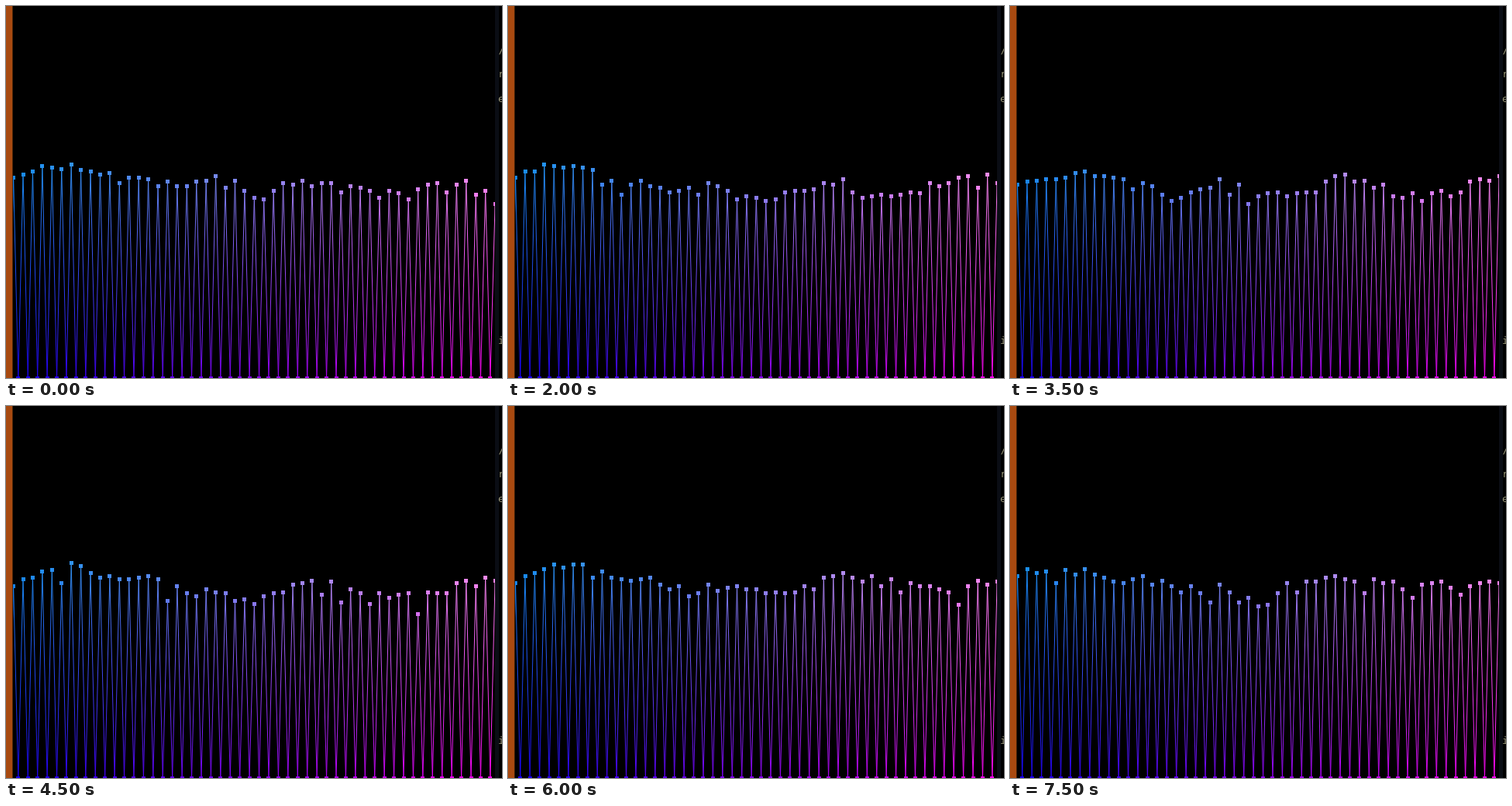
Recreate the animation shown at these times as an HTML page with a canvas. Size 640 px wide and 480 px high, loop 8 s.

```html
<!DOCTYPE html>
<html lang="en">
<head>
<meta charset="utf-8">
<title>Spectrum</title>
<style>
html, body { margin: 0; width: 100%; height: 100%; overflow: hidden; background: #000; }
canvas { display: block; }
</style>
</head>
<body>
<canvas id="stage" width="640" height="480"></canvas>
<script>
const ctx = document.getElementById('stage').getContext('2d');
const W = 640, H = 480, LOOP = 8000, STEP = 500;
const LEFT = 9, RIGHT = 631, BARS = 51, GAP = 12.43, X0 = 9.6;
const BASE = 232, UNIT = H / 256;

// Lasting hills and dips of the spectrum along the bars
const bumps = [
  { at: 5.5, width: 5, lift: 20 },
  { at: 17, width: 2, lift: -10 },
  { at: 25, width: 2.2, lift: -15 },
  { at: 33, width: 2, lift: 8 },
  { at: 41, width: 3, lift: -9 },
  { at: 50, width: 4, lift: 5 }
];

const mix = (a, b, t) => a + (b - a) * t;
const bell = d => Math.exp(-d * d);

// Seeded random number from -1 to 1
function noise(i, seed) {
  const s = Math.sin(i * 127.1 + seed * 311.7 + 17.3) * 43758.5453;
  return (s - Math.floor(s)) * 2 - 1;
}

function smoothNoise(x, seed) {
  const n = Math.floor(x), t = x - n;
  return mix(noise(n, seed), noise(n + 1, seed), t * t * (3 - 2 * t));
}

function peakY(i, step) {
  let y = BASE;
  for (const b of bumps) y -= b.lift * bell((i - b.at) / b.width);
  y += 10 * smoothNoise(i / 5, step + 40);
  const n = noise(i, step);
  y += 7 * n + 16 * Math.max(0, n) ** 8;
  return H - Math.round((H - y) / UNIT) * UNIT;
}

// Red rises to the right, green rises with height
function tint(x, y) {
  const r = mix(18, 255, x / W), g = (H - y) * 0.53;
  return `rgb(${Math.round(r)},${Math.round(g)},240)`;
}

function line(x1, y1, x2, y2) {
  const g = ctx.createLinearGradient(0, y1, 0, y2);
  g.addColorStop(0, tint(x1, y1));
  g.addColorStop(1, tint(x2, y2));
  ctx.strokeStyle = g;
  ctx.beginPath();
  ctx.moveTo(x1, y1);
  ctx.lineTo(x2, y2);
  ctx.stroke();
}

function dot(x, y) {
  ctx.fillStyle = tint(x, y);
  ctx.fillRect(Math.round(x - 2.5), Math.round(y - 2.5), 5, 5);
}

function box(color, x, w) {
  ctx.fillStyle = color;
  ctx.fillRect(x, 0, w, H);
}

function drawSides() {
  box('#a84a10', 0, 8);
  box('#4c2608', 8, 1);
  box('#0a0d14', RIGHT, 5);
  ctx.fillStyle = '#989678';
  ctx.font = '13px "DejaVu Sans Mono", monospace';
  ctx.fillText('/', 635.5, 61);
  ctx.fillText('r', 635, 92);
  ctx.fillText('e', 635, 124);
  ctx.fillText('i', 635, 436);
}

function draw(step) {
  box('#000', 0, W);
  drawSides();

  ctx.save();
  ctx.beginPath();
  ctx.rect(LEFT, 0, RIGHT - LEFT, H);
  ctx.clip();
  const peaks = Array.from({ length: BARS }, (_, i) => ({ x: X0 + i * GAP, y: peakY(i, step) }));
  for (const { x, y } of peaks) {
    line(x, y, x - GAP / 2, H);
    line(x, y, x + GAP / 2, H);
  }
  for (const { x, y } of peaks) {
    dot(x, y);
    dot(x + GAP / 2, H);
  }
  ctx.restore();
}

const start = performance.now();
let shown = 0;

function tick() {
  const t = (performance.now() - start) % LOOP;
  const step = Math.floor(t / STEP);
  if (step !== shown) draw(shown = step);
  requestAnimationFrame(tick);
}

draw(0);
requestAnimationFrame(tick);
</script>
</body>
</html>
```
